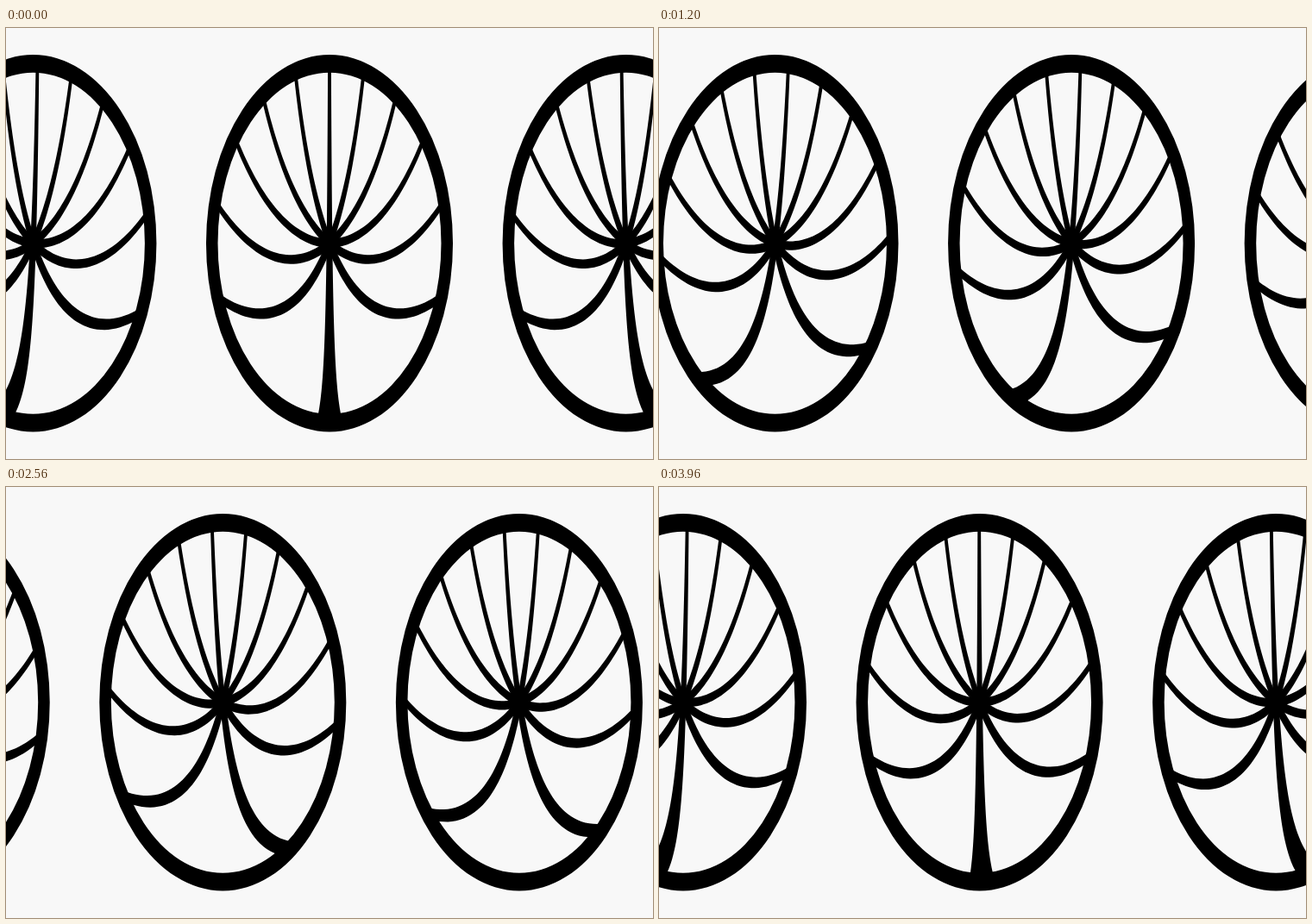
An HTML page with a canvas that plays this animation: 750 px wide and 500 px high, repeating every 4000 ms.

```html
<!DOCTYPE html>
<html lang="en">
<head>
<meta charset="utf-8">
<title>Rolling wheels</title>
<style>
html, body { margin: 0; width: 100%; height: 100%; overflow: hidden; background: #f8f8f8; }
canvas { display: block; width: 750px; height: 500px; }
</style>
</head>
<body>
<canvas id="stage" width="750" height="500"></canvas>
<script>
const ctx = document.getElementById('stage').getContext('2d');
const LOOP = 4000, STEP = 40;
const CENTER_X = 375, CENTER_Y = 249.8, SPACING = 343.6;
const RADIUS = 218.7, INNER = 198, SQUASH = 0.654;
const SPOKES = 12, SPOKE_WIDTH = 10.2, LAG = 0.82;
const TURN = 26.2 * Math.PI / 180; // rotation per wheel spacing

// Solves a + k sin(a) = angle by Newton's method.
function laggedAngle(angle, k) {
  const wrapped = Math.atan2(Math.sin(angle), Math.cos(angle));
  const goal = Math.abs(wrapped);
  let a = goal / (1 + k);
  for (let i = 0; i < 10; i++) {
    a -= (a + k * Math.sin(a) - goal) / (1 + k * Math.cos(a));
  }
  return Math.sign(wrapped) * a;
}

// Maps a point of a straight spoke to its sheared, contracted place.
function spokePoint(angle, along, across) {
  const r = Math.hypot(along, across);
  const a = laggedAngle(angle + Math.atan2(across, along), LAG * r / RADIUS);
  return [r * Math.sin(a) * SQUASH, -r * Math.cos(a)];
}

function drawSpoke(angle) {
  const end = (RADIUS + INNER) / 2, count = 40, half = SPOKE_WIDTH / 2;
  ctx.beginPath();
  for (let i = 0; i <= count; i++) ctx.lineTo(...spokePoint(angle, end * i / count, -half));
  for (let i = count; i >= 0; i--) ctx.lineTo(...spokePoint(angle, end * i / count, half));
  ctx.fill();
}

function drawWheel(x, phase) {
  ctx.save();
  ctx.translate(x, CENTER_Y);
  ctx.beginPath();
  for (const r of [RADIUS, INNER]) {
    ctx.moveTo(r * SQUASH, 0);
    ctx.ellipse(0, 0, r * SQUASH, r, 0, 0, 2 * Math.PI);
  }
  ctx.fill('evenodd');
  for (let i = 0; i < SPOKES; i++) drawSpoke(phase + i * 2 * Math.PI / SPOKES);
  ctx.restore();
}

function draw(time) {
  const progress = Math.floor(time % LOOP / STEP) * STEP / LOOP;
  ctx.fillStyle = '#f8f8f8';
  ctx.fillRect(0, 0, 750, 500);
  ctx.fillStyle = '#000';
  for (let n = -2; n <= 1; n++) {
    const travel = progress + n;
    drawWheel(CENTER_X + travel * SPACING, travel * TURN);
  }
}

const start = performance.now();
function tick() {
  draw(performance.now() - start);
  requestAnimationFrame(tick);
}
tick();
</script>
</body>
</html>
```
